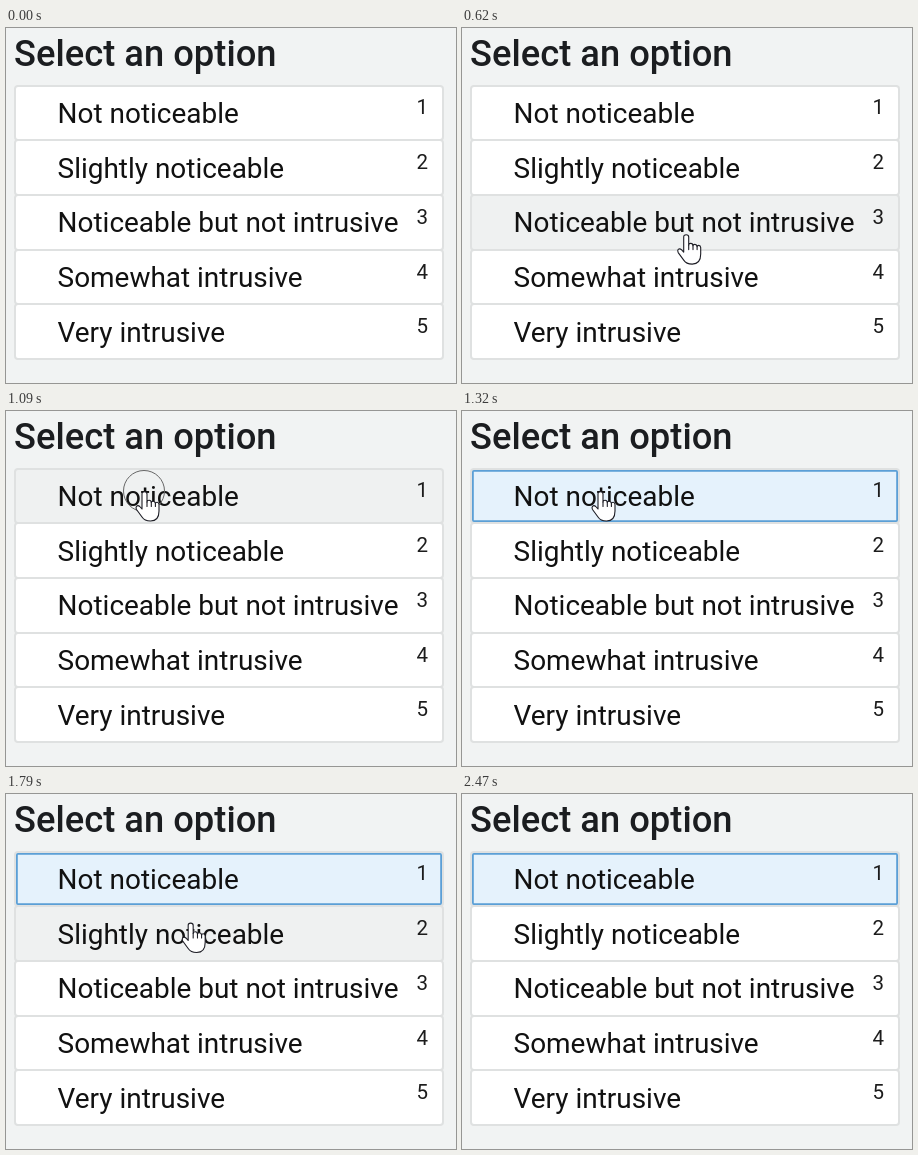
Write an HTML page that moves like this. It is 450 px wide and 355 px high and loops after 3.33 s.

```html
<!DOCTYPE html>
<html lang="en">
<head>
<meta charset="utf-8">
<title>Select an option</title>
<style>
  html, body { margin: 0; width: 100%; height: 100%; overflow: hidden; background: #f1f3f3; }
  svg { display: block; width: 450px; height: 355px; font-family: Roboto, Arial, sans-serif; }
  .title { font-size: 36.3px; font-weight: 500; fill: #1b1d20; }
  .label { font-size: 27.95px; fill: #111; }
  .key { font-size: 20.5px; fill: #1c1c1c; }
  .row rect { fill: #fff; stroke: #dfe1e1; stroke-width: 2; }
  .row.hover rect { fill: #eff1f1; }
  .row .mark { display: none; }
  .row.selected .mark { display: inline; fill: #e5f2fc; stroke: #5b9fd6; stroke-width: 1.8; }
  #press { fill: none; stroke: #666; stroke-width: 1; }
  #hand { stroke: #1c1c24; stroke-width: 1.1; stroke-linejoin: round; stroke-linecap: round; }
</style>
</head>
<body>
<svg viewBox="0 0 450 355">
  <text class="title" x="8" y="38">Select an option</text>
  <g id="list"></g>
  <circle id="press" cx="138" cy="80" r="20.5"/>
  <g id="hand">
    <path fill="#fff" d="M-2.5 18V3Q-2.5 .7 0 .7T2.5 3V11Q2.5 9.3 4.6 9.3T6.8 11.5Q6.8 10.3 8.7 10.3T10.9 12.5Q10.9 11.3 12.6 11.3T14.5 13.5V20Q14.5 30 6 30Q0 30 -2.5 26L-8 18.5Q-9 16.5 -8 15.3Q-6.5 14 -4.8 15.5Z"/>
    <path fill="none" d="M2.5 11V15.5M6.8 11.5V15.5M10.9 12.5V15.5"/>
  </g>
</svg>
<script>
  const LOOP = 3330, TOP = 57, PITCH = 54.7;
  const ENTER = 460, PRESS = 1090, SELECT = 1320, LEAVE = 2470;
  const labels = ['Not noticeable', 'Slightly noticeable', 'Noticeable but not intrusive',
                  'Somewhat intrusive', 'Very intrusive'];

  const easeOut = u => 1 - (1 - u) ** 1.3;
  const easeIn = u => u ** 1.3;
  const linear = u => u;

  // The pointer jumps `count` times, every `step` ms, along each line.
  const moves = [
    { start: ENTER, step: 80, count: 5, from: [305, 325], to: [138.5, 80], ease: easeOut },
    { start: 1640, step: 75, count: 6, from: [148, 81], to: [301, 279], ease: easeIn },
    { start: 2190, step: 70, count: 3, from: [313, 295], to: [363, 347], ease: linear }
  ];

  function pointer(t) {
    if (t < ENTER || t >= LEAVE) return null;
    const m = moves.filter(move => move.start <= t).pop();
    const jumps = Math.min(Math.floor((t - m.start) / m.step), m.count);
    const u = m.ease(jumps / m.count);
    return m.from.map((a, i) => a + (m.to[i] - a) * u);
  }

  const $ = id => document.getElementById(id);
  const show = (el, on) => { el.style.display = on ? '' : 'none'; };
  const rowTop = i => Math.floor(TOP + i * PITCH);

  $('list').innerHTML = labels.map((label, i) => {
    const y = rowTop(i), height = rowTop(i + 1) - y;
    const base = Math.round(95 + i * PITCH), keyBase = Math.round(86.4 + i * PITCH);
    return `<g class="row">
      <rect x="9" y="${y + 1}" width="428" height="${height}" rx="3"/>
      <rect class="mark" x="10.9" y="${y + 2.9}" width="424.2" height="${height - 3.8}" rx="1"/>
      <text class="label" x="51.6" y="${base}">${label}</text>
      <text class="key" x="410.5" y="${keyBase}">${i + 1}</text>
    </g>`;
  }).join('');
  const rows = [...document.querySelectorAll('.row')];

  function draw(t) {
    const at = pointer(t);
    const over = at ? Math.floor((at[1] - TOP) / PITCH) : -1;
    rows.forEach((row, i) => {
      row.classList.toggle('hover', i === over);
      row.classList.toggle('selected', i === 0 && t >= SELECT);
    });
    show($('press'), t >= PRESS && t < SELECT);
    show($('hand'), at);
    if (at) $('hand').setAttribute('transform', `translate(${at})`);
  }

  function tick() {
    draw(performance.now() % LOOP);
    requestAnimationFrame(tick);
  }
  tick();
</script>
</body>
</html>
```
